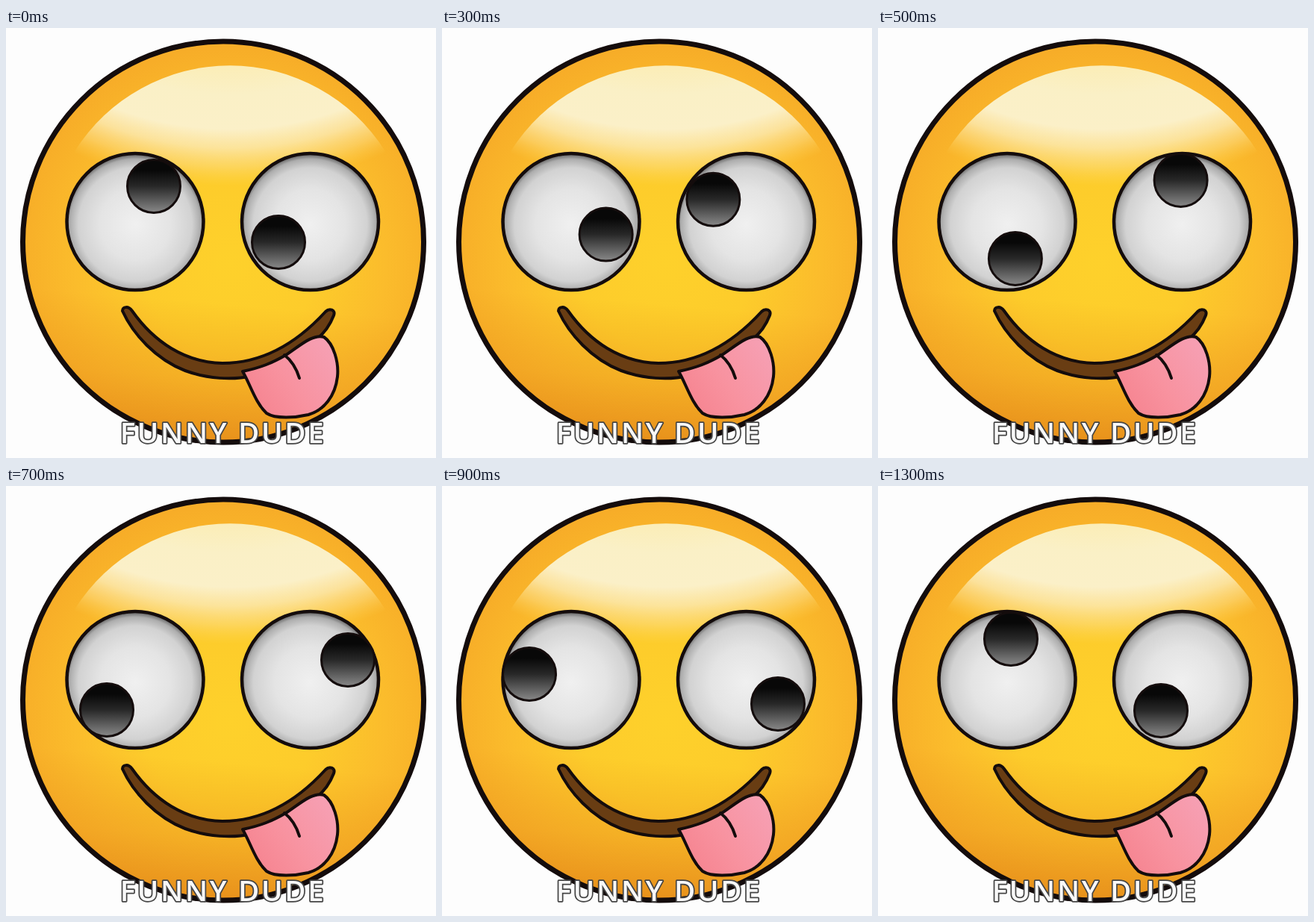
Animation of 576x576 px, one loop 1400 ms. Source, as an HTML page:

```html
<!DOCTYPE html>
<html lang="en">
<head>
<meta charset="utf-8">
<title>Funny dude</title>
<style>
  html, body { margin: 0; width: 100%; height: 100%; overflow: hidden; background: #fdfdfd; }
  svg { display: block; width: 100vw; height: 100vh; }
  .face { filter: blur(.7px); }
  text {
    font: 600 38.5px "Open Sans", "Noto Sans", sans-serif;
    letter-spacing: 2.7px;
    fill: #f8f8f8; stroke: #444; stroke-width: 3.4px; stroke-linejoin: round;
    paint-order: stroke;
    filter: blur(.5px);
  }
</style>
</head>
<body>
<svg viewBox="0 0 576 576">
  <defs>
    <radialGradient id="skin" cx="300" cy="315" r="290" gradientUnits="userSpaceOnUse">
      <stop offset="0" stop-color="#fed12b"/>
      <stop offset=".4" stop-color="#fdcc2b"/>
      <stop offset=".72" stop-color="#fbbc2c"/>
      <stop offset="1" stop-color="#f7ad28"/>
    </radialGradient>
    <linearGradient id="shade" x1="300" y1="370" x2="285" y2="556" gradientUnits="userSpaceOnUse">
      <stop offset="0" stop-color="#e58a14" stop-opacity="0"/>
      <stop offset=".55" stop-color="#e9911b" stop-opacity=".4"/>
      <stop offset="1" stop-color="#e48a18" stop-opacity=".85"/>
    </linearGradient>
    <radialGradient id="gloss" cx="300" cy="-300" r="512" gradientUnits="userSpaceOnUse">
      <stop offset=".68" stop-color="#fbedb6"/>
      <stop offset=".76" stop-color="#faf0c6"/>
      <stop offset=".85" stop-color="#fbf0c8"/>
      <stop offset=".9" stop-color="#fce9ae" stop-opacity=".85"/>
      <stop offset=".95" stop-color="#fde08a" stop-opacity=".5"/>
      <stop offset="1" stop-color="#fed65a" stop-opacity="0"/>
    </radialGradient>
    <radialGradient id="ball" cx=".5" cy=".52" r=".52">
      <stop offset="0" stop-color="#f0f0f0"/>
      <stop offset=".5" stop-color="#e4e4e4"/>
      <stop offset=".8" stop-color="#d2d2d2"/>
      <stop offset=".92" stop-color="#adadad"/>
      <stop offset="1" stop-color="#555"/>
    </radialGradient>
    <linearGradient id="iris" x1="0" y1="0" x2="0" y2="1">
      <stop offset=".2" stop-color="#080808"/>
      <stop offset=".5" stop-color="#282828"/>
      <stop offset=".95" stop-color="#808080"/>
    </linearGradient>
    <linearGradient id="pink" x1="0" y1=".8" x2="1" y2=".2">
      <stop offset="0" stop-color="#f5828e"/>
      <stop offset=".45" stop-color="#f8929f"/>
      <stop offset="1" stop-color="#f6a0b4"/>
    </linearGradient>
  </defs>

  <g class="face" stroke="#140c0c" stroke-linejoin="round" stroke-linecap="round">
    <circle cx="291" cy="286.5" r="268.5" fill="url(#skin)" stroke="none"/>
    <circle cx="291" cy="286.5" r="268.5" fill="url(#shade)" stroke-width="7"/>
    <path d="M92 165A246 246 0 0 1 508 165L490 215H110Z" fill="url(#gloss)" stroke="none"/>

    <g fill="url(#ball)" stroke-width="4.5">
      <circle cx="173" cy="259.5" r="91.5"/>
      <circle cx="407.5" cy="259.5" r="91.5"/>
    </g>
    <g id="pupils" fill="url(#iris)" stroke-width="3">
      <circle r="35.5"/>
      <circle r="35.5"/>
    </g>

    <path d="M156 379C156 373 164 372 169 379C198 420 239 448 290 449C350 449 395 416 428 380C433 375 442 377 439 385C434 398 426 409 416 417L330 466C303 472 270 470 240 459C201 444 170 410 156 379Z"
      fill="#693d13" stroke-width="4"/>
    <path d="M317 460C341 455 356 449 375 438C392 427 411 409 426 414C439 423 446 448 444 467C441 493 426 512 405 518C388 522 361 524 349 516C334 502 327 477 317 460Z"
      fill="url(#pink)" stroke-width="4"/>
    <path d="M373 438Q387 449 393 469" fill="none" stroke-width="4"/>
  </g>
  <text x="290.5" y="556" text-anchor="middle">FUNNY DUDE</text>
</svg>
<script>
const STEP = 100, COUNT = 14;

// Each key: step, x, y; pupils travel clockwise around their pivot.
const eyes = [
  { pivot: [170, 254], keys: [[0, 198, 212], [2, 223, 253], [4, 206, 297], [7, 135, 300],
    [9, 117, 252], [11, 138, 215], [13, 178, 205]] },
  { pivot: [407, 259], keys: [[0, 365, 287], [2, 357, 249], [4, 377, 214], [7, 458, 233],
    [9, 450, 292], [11, 416, 310], [13, 379, 301]] }
];
const pupils = document.querySelectorAll("#pupils circle");
const TAU = Math.PI * 2;

function polar([step, x, y], [px, py]) {
  return { step, angle: Math.atan2(y - py, x - px), radius: Math.hypot(x - px, y - py) };
}

for (const eye of eyes) {
  const path = eye.keys.map(key => polar(key, eye.pivot));
  path.push({ ...path[0], step: COUNT });
  for (let i = 1; i < path.length; i++) {
    while (path[i].angle < path[i - 1].angle) path[i].angle += TAU;
  }
  eye.path = path;
}

function place({ path, pivot }, step) {
  const i = path.findIndex(key => key.step > step);
  const a = path[i - 1], b = path[i];
  const k = (step - a.step) / (b.step - a.step);
  const angle = a.angle + (b.angle - a.angle) * k;
  const radius = a.radius + (b.radius - a.radius) * k;
  return [pivot[0] + radius * Math.cos(angle), pivot[1] + radius * Math.sin(angle)];
}

const start = performance.now();
function draw(now) {
  const step = Math.floor(Math.max(0, now - start) / STEP) % COUNT;
  eyes.forEach((eye, i) => {
    const [x, y] = place(eye, step);
    pupils[i].setAttribute("cx", x.toFixed(2));
    pupils[i].setAttribute("cy", y.toFixed(2));
  });
  requestAnimationFrame(draw);
}
draw(start);
</script>
</body>
</html>
```
